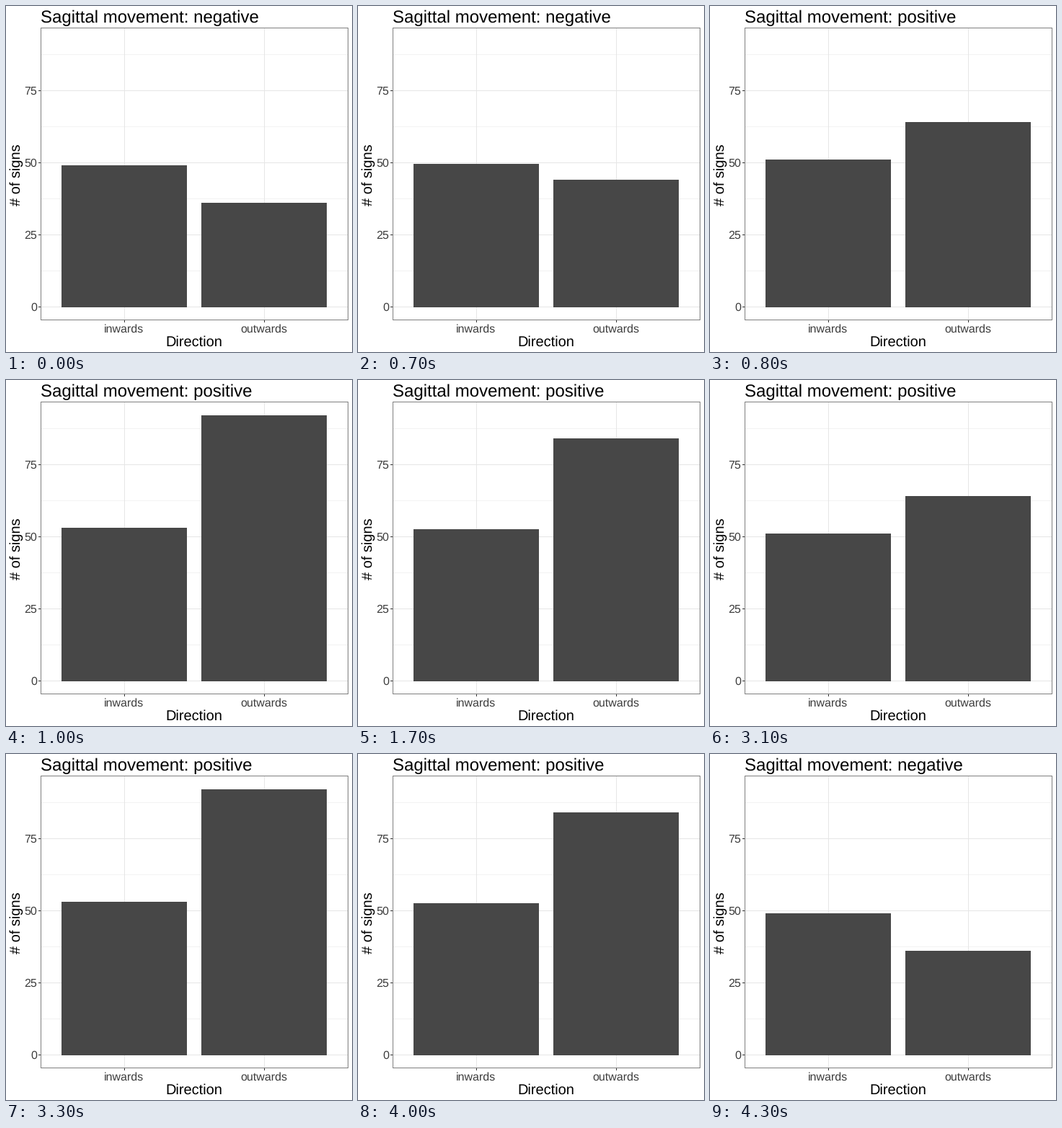
A matplotlib script for the animation above (5 s loop, 480x480 px).

```python
import matplotlib.pyplot as plt
from matplotlib.animation import FuncAnimation
from matplotlib.patches import Rectangle

SIZE, DPI = 480, 96
PT = 72 / DPI
FRAMES, INTERVAL = 50, 100

LEFT, RIGHT, TOP, BOTTOM = 48, 474, 30, 435
ZERO_Y, UNIT = 417.4, 4.004
BAR_LEFTS, BAR_WIDTH, BAR_BASE = (77, 271), 174, 418
NEGATIVE, POSITIVE = (49, 36), (53, 92)

BAR, BORDER, TICK = "#474747", "#7f7f7f", "#333333"
MAJOR, MINOR, LABEL = "#e6e6e6", "#f2f2f2", "#3d3d3d"

plt.rcParams["font.family"] = "Liberation Sans"
plt.rcParams["text.hinting"] = "none"

fig = plt.figure(figsize=(SIZE / DPI, SIZE / DPI), dpi=DPI, facecolor="white")
ax = fig.add_axes([0, 0, 1, 1])
ax.set(xlim=(0, SIZE), ylim=(SIZE, 0))
ax.axis("off")


def box(x, y, w, h, color, z=1):
    patch = Rectangle((x, y), w, h, facecolor=color, linewidth=0,
                      antialiased=False, zorder=z)
    return ax.add_patch(patch)


def text(x, y, s, px, color="black", **kw):
    return ax.text(x, y, s, fontsize=px * PT, color=color, va="baseline",
                   zorder=5, **kw)


def value_y(value):
    return ZERO_Y - value * UNIT


def draw_chart():
    for value in (12.5, 37.5, 62.5, 87.5):
        box(LEFT, int(value_y(value)), RIGHT - LEFT, 1, MINOR)
    for value in (0, 25, 50, 75):
        y = int(value_y(value))
        box(LEFT, y, RIGHT - LEFT, 1, MAJOR)
        box(45, y, 3, 1, TICK)
        text(42.8, y + 6, str(value), 16, LABEL, ha="right")
    for x, name in ((164, "inwards"), (358, "outwards")):
        box(x, TOP, 1, BOTTOM - TOP, MAJOR)
        box(x, BOTTOM + 1, 1, 3, TICK)
        text(x, 453, name, 16, LABEL, ha="center")
    for y in (TOP, BOTTOM):
        box(LEFT, y, RIGHT - LEFT + 1, 1, BORDER, 4)
    for x in (LEFT, RIGHT):
        box(x, TOP, 1, BOTTOM - TOP + 1, BORDER, 4)
    text(261, 472, "Direction", 20, ha="center")
    text(20, 234, "# of signs", 20, ha="center", rotation=90,
         rotation_mode="anchor")


def ramp(step):
    """Linear transition lasting 2.8 steps, sampled 0.4 steps in."""
    return min(max((2 + 5 * step) / 14, 0), 1)


def progress(i):
    """Share of the way from the negative to the positive state."""
    if i < 17:
        return ramp(i - 7)
    if i < 31:
        return ramp(max(19 - i, 0))  # rests just short of the negative state
    if i < 40:
        return ramp(i - 30)
    return ramp(42 - i)


draw_chart()
title = text(47.8, 23, "", 24)
bars = [box(x, 0, BAR_WIDTH, 1, BAR, 3) for x in BAR_LEFTS]


def update(i):
    p = progress(i)
    for bar, low, high in zip(bars, NEGATIVE, POSITIVE):
        top = round(value_y(low + (high - low) * p))
        bar.set_y(top)
        bar.set_height(BAR_BASE - top)
    rising = i < 17 or 31 <= i < 40
    positive = p > 0.5 or (p == 0.5 and rising)
    title.set_text("Sagittal movement: " + ("positive" if positive else "negative"))
    return [*bars, title]


anim = FuncAnimation(fig, update, frames=FRAMES, interval=INTERVAL,
                     repeat=True, repeat_delay=0, blit=False)
plt.show()
```
